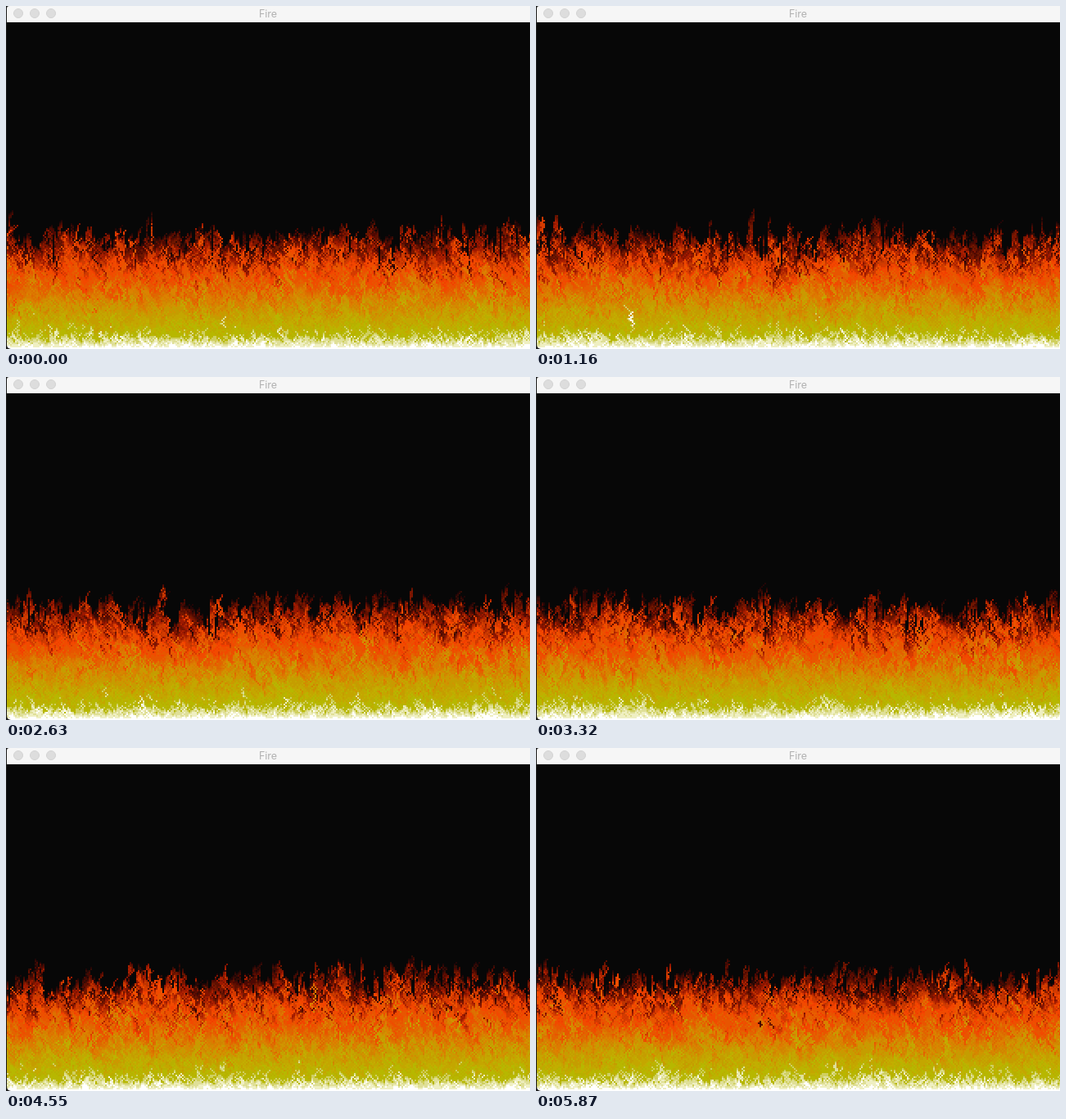
Animation of 640x420 px, one loop 5970 ms. Source, as an HTML page with a canvas:

```html
<!DOCTYPE html>
<html lang="en">
<head>
<meta charset="utf-8">
<title>Fire</title>
<style>
  html, body { margin: 0; width: 100%; height: 100%; overflow: hidden; background: #1c1c1c; }
  #window { position: absolute; left: 1px; top: 0; width: 639px; height: 420px;
    background: #070707; border-radius: 3px 0 0 5px; overflow: hidden; }
  #bar { position: absolute; left: 0; top: 0; width: 639px; height: 19px; background: #f6f6f6;
    border-bottom: 1px solid #e4e4e4; }
  #bar i { position: absolute; top: 3px; width: 10px; height: 10px; border-radius: 50%;
    border: 1px solid #d3d3d3; background: #dddddd; }
  #title { position: absolute; left: 0; width: 638px; top: 0; line-height: 19px; text-align: center;
    font-family: Inter, Roboto, sans-serif; font-size: 12.5px; color: #b1b1b1; }
  #fire { position: absolute; left: 0; top: 160px; width: 640px; height: 260px; image-rendering: pixelated; }
</style>
</head>
<body>
<div id="window">
  <canvas id="fire" width="320" height="130"></canvas>
  <div id="bar">
    <i style="left:8px"></i><i style="left:28px"></i><i style="left:48px"></i>
    <div id="title">Fire</div>
  </div>
</div>
<script>
const W = 320, H = 130, LOOP = 5970, WARMUP = 150, STEPS_PER_SECOND = 60;

// Heat palette from cold to hot, stored as wide-gamut colours.
const HEAT = ('070707 1f0707 2f0f07 470f07 571707 671f07 771f07 8f2707 9f2f07 af3f07 ' +
  'bf4707 c74707 df4f07 df5707 df5707 d75f07 d75f07 d7670f cf6f0f cf770f cf7f0f cf8717 ' +
  'c78717 c78f17 c7971f bf9f1f bf9f1f bfa727 bfa727 bfaf2f b7af2f b7b72f b7b737 ' +
  'cfcf6f dfdf9f efefc7 ffffff').split(' ');
const TO_SRGB = [[1.2249, -0.2247, 0], [-0.0420, 1.0419, 0], [-0.0196, -0.0786, 1.0979]];

const decode = v => v <= 0.04045 ? v / 12.92 : ((v + 0.055) / 1.055) ** 2.4;
const encode = v => v <= 0.0031308 ? v * 12.92 : 1.055 * v ** (1 / 2.4) - 0.055;

function toPixel(hex) {
  const lin = [0, 2, 4].map(i => decode(parseInt(hex.slice(i, i + 2), 16) / 255));
  const [r, g, b] = TO_SRGB.map(row => {
    const v = row.reduce((sum, k, i) => sum + k * lin[i], 0);
    return Math.round(255 * encode(Math.min(1, Math.max(0, v))));
  });
  return (255 << 24 | b << 16 | g << 8 | r) >>> 0;
}
const palette = Uint32Array.from(HEAT, toPixel);

// Picture changes: runs of eleven evenly spaced changes, then the last two.
const RUNS = [[60, 650], [710, 1280], [1340, 1920], [1980, 2570], [2630, 3200],
  [3260, 3850], [3910, 4490], [4550, 5120], [5180, 5760]];
const times = [0];
for (const [from, to] of RUNS)
  for (let i = 0; i <= 10; i++) times.push(Math.round((from + (to - from) * i / 10) / 10) * 10);
times.push(5820, 5870);

let seed = 20190;
function random() {
  seed = (Math.imul(seed, 1664525) + 1013904223) >>> 0;
  return seed / 4294967296;
}

const heat = new Uint8Array(W * H);
heat.fill(HEAT.length - 1, W * (H - 1));

// Sweep from the bottom right, so heat climbs the whole flame within one step.
function step() {
  for (let src = W * H - 1; src >= W; src--) {
    const h = heat[src];
    if (h === 0) {
      heat[src - W] = 0;
    } else {
      const r = Math.round(random() * 3);
      const dst = src - W - r + 1;
      if (dst >= 0) heat[dst] = h - (r & 1);
    }
  }
}

for (let i = 0; i < WARMUP; i++) step();
let done = 0;
const frames = times.map(t => {
  const goal = Math.floor(t * STEPS_PER_SECOND / 1000);
  for (; done < goal; done++) step();
  return heat.slice();
});

const ctx = document.getElementById('fire').getContext('2d');
const image = ctx.createImageData(W, H);
const pixels = new Uint32Array(image.data.buffer);
let shown = -1;

function draw(t) {
  let n = times.length - 1;
  while (times[n] > t) n--;
  if (n === shown) return;
  shown = n;
  frames[n].forEach((h, i) => { pixels[i] = palette[h]; });
  ctx.putImageData(image, 0, 0);
}

const start = performance.now();
function tick() {
  draw((performance.now() - start) % LOOP);
  requestAnimationFrame(tick);
}
tick();
</script>
</body>
</html>
```
